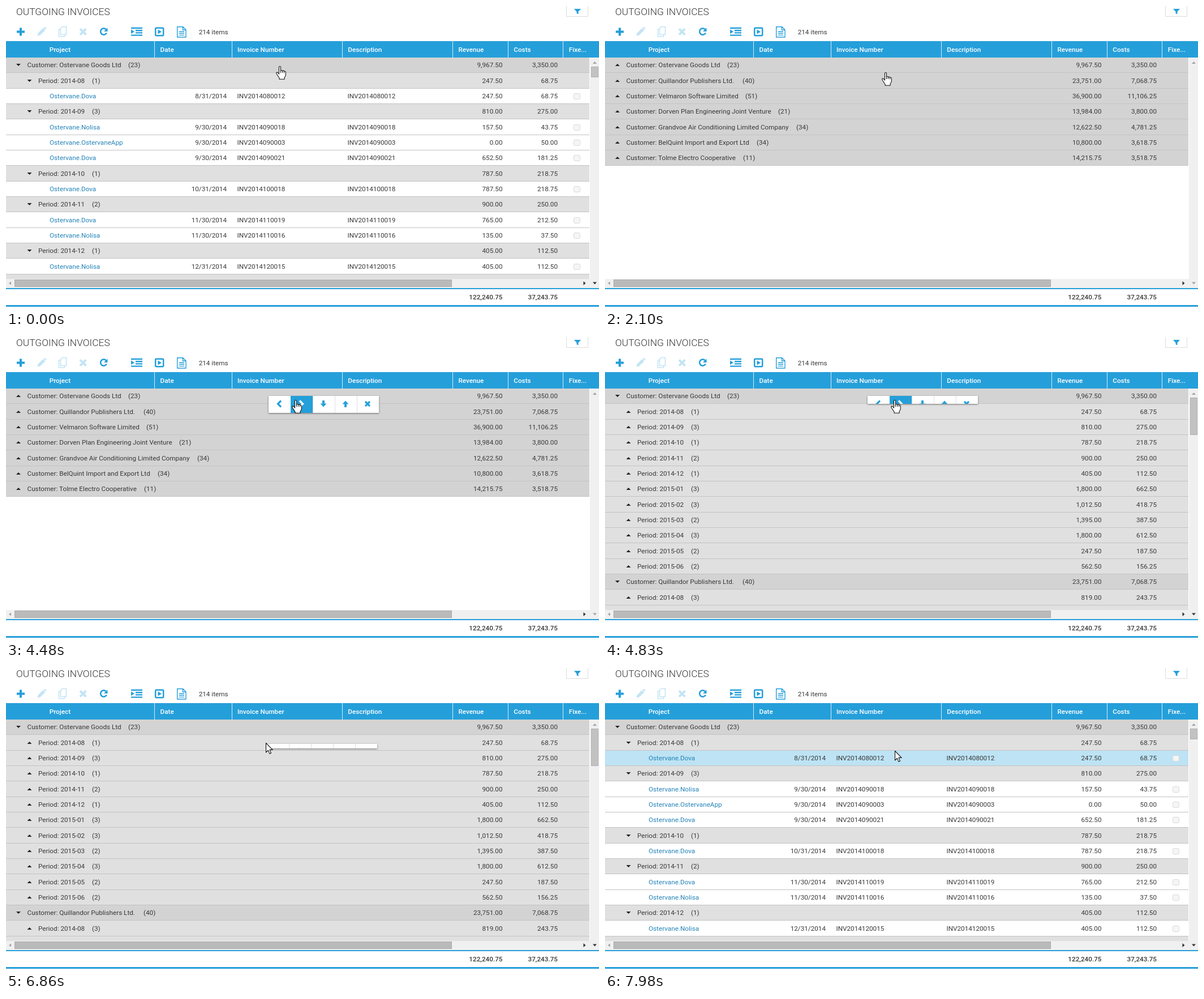
Animation of 1048x535 px, one loop 8 s. Source, as an HTML page:

```html
<!DOCTYPE html>
<html lang="en">
<head>
<meta charset="utf-8">
<title>Outgoing invoices</title>
<style>
  html, body { margin: 0; width: 100%; height: 100%; overflow: hidden; background: #fff; }
  svg { display: block; }
  #stage { font: 11.72px Roboto, sans-serif; fill: #383838; }
  .end { text-anchor: end; }
  .bold { font-weight: 500; }
  .title { font-size: 17.4px; font-weight: 300; fill: #333; }
  .head { fill: #fff; font-weight: 500; }
  .link { fill: #2383b8; }
  .blue { fill: #259fda; }
  .line { fill: none; stroke: #259fda; }
  .off { opacity: .27; }
  .customer { fill: #d4d3d3; }
  .period { fill: #e0e0e0; }
  .invoice { fill: #fff; }
  .invoice.hot { fill: #bde3f4; }
  .cell rect { fill: #fff; }
  .cell .edge { fill: #dedede; }
  .cell path { fill: #259fda; }
  .cell .stroke { fill: none; stroke: #259fda; stroke-width: 3.2; }
  .cell.on rect { fill: #259fda; }
  .cell.on path { fill: #fff; }
  .cell.on .stroke { fill: none; stroke: #fff; }
  #shadow { fill: #fff; filter: drop-shadow(0 1px 1.5px rgba(0, 0, 0, .5)); }
  #hand, #arrow { fill: #fff; stroke: #111; stroke-width: 1.1; stroke-linejoin: round; }
</style>
</head>
<body>
<svg id="stage" width="1048" height="535" viewBox="0 0 1048 535">
  <text class="title" x="18" y="16">OUTGOING INVOICES</text>
  <path d="M990.5-1V18.500H1028.500V-1" fill="none" stroke="#dcdcdc"/>
  <path class="blue" d="M1004 5h12l-4.500 5v4.500l-3-1.500v-3z"/>

  <g id="toolbar">
    <path class="line" d="M19 45.500h14M26 38.500v14" stroke-width="4"/>
    <g class="off">
      <path class="blue" d="M55.500 52.500l1-4.500 9-9 3.800 3.700-9.200 9zM66.500 38.200l1.200-1q1-.6 2 .3l1.200 1.300q.8 1-.1 1.900l-1 1.100z"/>
      <path class="line" d="M99.500 36.500h7v14h-10v-11zM96.500 41h-3v13h10v-3" stroke-width="1.600"/>
      <path class="line" d="M131 40.300l10.400 10.400M141.400 40.300l-10.400 10.400" stroke-width="4"/>
    </g>
    <path class="line" d="M177 41.500a5.600 5.600 0 1 0 .8 6" stroke-width="2.600"/>
    <path class="blue" d="M179.500 38.500v6.500h-6.500z"/>
    <path class="line" d="M221 39h20M229 43.200h12M229 47.400h12M221 51.600h20" stroke-width="2.400"/>
    <path class="blue" d="M221 41.500l6 3.800-6 3.800z"/>
    <rect class="line" x="264.200" y="38.700" width="14" height="13.600" rx="1.500" stroke-width="2.500"/>
    <path class="blue" d="M268.500 41.500l6.500 4-6.500 4z"/>
    <path class="line" d="M302.700 36.700h10l5.300 5.300v13h-15.300zM312.500 37v5.200h5.200M306 45.200h9M306 48.300h9M306 51.400h9" stroke-width="1.400"/>
    <text x="340.700" y="50">214 items</text>
  </g>

  <rect class="blue" y="62" width="1048" height="29"/>
  <g id="head"></g>
  <svg y="91" width="1032" height="391" viewBox="0 91 1032 391"><g id="views"></g></svg>

  <rect x="1032" y="91" width="16" height="407" fill="#f0f0f0"/>
  <rect y="482" width="1032" height="16" fill="#f0f0f0"/>
  <rect x="15.500" y="483.500" width="772" height="12" fill="#bababa" stroke="#aaa"/>
  <rect id="thumb" x="1034.500" y="107.500" width="12" fill="#c2c2c2" stroke="#b0b0b0"/>
  <path d="M9 486.500v6l-4-3zM1037 102h7l-3.500-4z" fill="#a3a3a3"/>
  <path d="M1020.500 486v7l4-3.500z" fill="#333"/>
  <path id="down" d="M1037 487.500h7l-3.500 4z"/>

  <rect y="498" width="1048" height="37" fill="#fff"/>
  <rect class="blue" y="498" width="1048" height="2"/>
  <rect class="blue" y="528" width="1048" height="3"/>
  <text class="end bold" x="877.500" y="518">122,240.75</text>
  <text class="end bold" x="975" y="518">37,243.75</text>

  <g id="menu">
    <rect id="shadow" width="195"/>
    <svg id="cells" width="195"></svg>
  </g>
  <g id="hand">
    <path d="M-1.500 2a1.500 1.500 0 0 1 3 0v6q1.500-1.200 3 .5 1.500-1 3 .7 2-.7 2.800 1v5q0 3-2.200 5v3h-9v-2q-2-3-4-6-1.800-2.500-1.200-3.600 1.400-1.400 3.200.9l1.400 1.600z"/>
    <path d="M1.500 8v4M4.500 8.500v3.500M7.500 9.200v3" fill="none"/>
  </g>
  <path id="arrow" d="M.5.5v16.500l3.800-3.600 2.600 6 2.600-1.100-2.600-5.900h5.200z"/>
</svg>

<script>
const $ = id => document.getElementById(id);
const TICK = 70, LOOP = 8000, ROW = 27.344, CELL = 39;

const money = n => n.toLocaleString('en-US', { minimumFractionDigits: 2, maximumFractionDigits: 2 });
const text = (x, y, s, cls = '') => `<text class="${cls}" x="${x}" y="${y}">${s}</text>`;

// Header
$('head').innerHTML =
  [[76.7, 'Project'], [272.5, 'Date'], [409, 'Invoice Number'], [604.3, 'Description'],
   [799.5, 'Revenue'], [897.3, 'Costs'], [994.8, 'Fixe...']].map(([x, s]) => text(x, 81, s, 'head')).join('') +
  [262, 399, 594, 789, 887, 984].map(x => `<rect x="${x}" y="62" width="1" height="29" fill="#d6edf8"/>`).join('');

// Grid data: name, count, x of count, revenue, costs
const customers = [
  ['Ostervane Goods Ltd', 23, 216, 9967.5, 3350],
  ['Quillandor Publishers Ltd.', 40, 243, 23751, 7068.75],
  ['Velmaron Software Limited', 51, 248, 36900, 11106.25],
  ['Dorven Plan Engineering Joint Venture', 21, 306, 13984, 3800],
  ['Grandvoe Air Conditioning Limited Company', 34, 338, 12622.5, 4781.25],
  ['BelQuint Import and Export Ltd', 34, 268, 10800, 3618.75],
  ['Tolme Electro Cooperative', 11, 244, 14215.75, 3518.75]
].map(([name, count, cx, rev, cost]) =>
  ({ kind: 'customer', x: 37.5, label: 'Customer: ' + name, count, cx, rev, cost }));

const period = (month, count, rev, cost) =>
  ({ kind: 'period', x: 57, label: 'Period: ' + month, count, cx: 152, rev, cost });
const periods = [
  ['2014-08', 1, 247.5, 68.75], ['2014-09', 3, 810, 275], ['2014-10', 1, 787.5, 218.75],
  ['2014-11', 2, 900, 250], ['2014-12', 1, 405, 112.5], ['2015-01', 3, 1800, 662.5],
  ['2015-02', 3, 1012.5, 418.75], ['2015-03', 2, 1395, 387.5], ['2015-04', 3, 1800, 612.5],
  ['2015-05', 2, 247.5, 187.5], ['2015-06', 2, 562.5, 156.25]
].map(p => period(...p));

const invoice = (project, date, no, rev, cost) =>
  ({ kind: 'invoice', project: 'Ostervane.' + project, date, no: 'INV' + no, rev, cost });
const invoices = [
  [invoice('Dova', '8/31/2014', '2014080012', 247.5, 68.75)],
  [invoice('Nolisa', '9/30/2014', '2014090018', 157.5, 43.75),
   invoice('OstervaneApp', '9/30/2014', '2014090003', 0, 50),
   invoice('Dova', '9/30/2014', '2014090021', 652.5, 181.25)],
  [invoice('Dova', '10/31/2014', '2014100018', 787.5, 218.75)],
  [invoice('Dova', '11/30/2014', '2014110019', 765, 212.5),
   invoice('Nolisa', '11/30/2014', '2014110016', 135, 37.5)],
  [invoice('Nolisa', '12/31/2014', '2014120015', 405, 112.5)]
];

const open = row => ({ ...row, open: true });
const cutOff = { kind: 'period' };
const views = [
  [open(customers[0]), ...invoices.flatMap((list, i) => [open(periods[i]), ...list]), cutOff],
  customers,
  [open(customers[0]), ...periods, open(customers[1]), period('2014-08', 3, 819, 243.75), cutOff]
];

function drawRow(row, i) {
  const top = Math.round(91 + ROW * i), next = Math.round(91 + ROW * (i + 1));
  const base = Math.round(108.2 + ROW * i), mid = base - 4;
  let out = `<rect class="${row.kind}" y="${top}" width="1031" height="${next - top}"/>` +
    `<rect y="${next - 1}" width="1031" height="1" fill="#c3c3c3"/>`;
  if (row === cutOff) return out;
  if (row.kind === 'invoice') {
    out += text(77, base, row.project, 'link') + text(390, base, row.date, 'end') +
      text(408.5, base, row.no) + text(603.5, base, row.no) +
      `<rect x="1003.5" y="${mid - 4.5}" width="11" height="10" rx="2.5" fill="#f5f5f5" stroke="#dadada"/>`;
  } else {
    const tip = row.open ? `${mid - 2}h8l-4 4z` : `${mid + 2}h8l-4-4z`;
    out += `<path d="M${row.x - 19.5} ${tip}" fill="#222"/>` +
      text(row.x, base, row.label) + text(row.cx, base, `(${row.count})`);
  }
  return out + text(877.5, base, money(row.rev), 'end') + text(975, base, money(row.cost), 'end');
}
$('views').innerHTML = views.map(rows => `<g>${rows.map(drawRow).join('')}</g>`).join('');
const groups = [...$('views').children];
const hotRow = groups[0].querySelector('.invoice');

// Popup menu
const icons = [
  ['stroke', 'M3-5.5l-5.500 5.500 5.500 5.500'],
  ['stroke', 'M-3-5.5l5.500 5.500-5.500 5.500'],
  ['', 'M-2-6h4v5.500h3.500l-5.500 6-5.500-6h3.500z'],
  ['', 'M-2 6h4v-5.500h3.500l-5.500-6-5.500 6h3.500z'],
  ['stroke', 'M-4-4l8 8M4-4l-8 8']
];
$('cells').innerHTML = icons.map(([cls, d], i) =>
  `<g class="cell" transform="translate(${i * CELL})"><rect width="${CELL}" height="30"/>` +
  (i ? '<rect class="edge" width="1" height="30"/>' : '') +
  `<path class="${cls}" transform="translate(19 14)" d="${d}"/></g>`).join('');
const cells = [...document.querySelectorAll('.cell')];

// Timeline
const moves = [ // start, steps, x, y
  [0, 1, 484, 106], [1540, 4, 496, 117], [2660, 6, 462, 102], [4130, 6, 512, 111],
  [5530, 1, 515, 112], [5600, 7, 456, 134], [6230, 2, 459, 132], [7210, 4, 512, 146]
];
const menus = [[560, 1960, 486, 108], [3710, 4830, 464, 104], [6860, 7840, 461, 134]];
const slide = [8, 22, 29, 30];

const ease = p => p * p * (3 - 2 * p);
const show = (el, on) => el.setAttribute('visibility', on ? 'visible' : 'hidden');
const place = (el, x, y) => el.setAttribute('transform', `translate(${x} ${y})`);

function pointer(t) {
  let x = moves[0][2], y = moves[0][3];
  for (const [start, steps, toX, toY] of moves) {
    if (t < start) break;
    const p = ease(Math.min(1, ((t - start) / TICK + 1) / steps));
    x += (toX - x) * p;
    y += (toY - y) * p;
  }
  return [Math.round(x), Math.round(y)];
}

function render(now) {
  const t = Math.floor(now % LOOP / TICK) * TICK;
  const view = t < 2030 ? 0 : t < 4830 ? 1 : t < 7910 ? 2 : 0;
  const hot = t >= 7980;
  const [x, y] = pointer(t);

  groups.forEach((g, i) => g.style.display = i === view ? '' : 'none');
  hotRow.classList.toggle('hot', hot);
  show($('thumb'), view !== 1);
  $('thumb').setAttribute('height', view === 2 ? 65 : 18);
  $('down').setAttribute('fill', view === 1 ? '#a3a3a3' : '#333');

  const menu = menus.find(([from, to]) => t >= from && t < to + TICK);
  let over = -1;
  $('menu').style.display = menu ? '' : 'none';
  if (menu) {
    const [from, to, mx, my] = menu;
    const h = t >= to ? 14 : slide[Math.min(3, (t - from) / TICK)];
    place($('menu'), mx, my);
    $('shadow').setAttribute('height', h);
    $('cells').setAttribute('height', h);
    if (y >= my && x >= mx) over = Math.floor((x - mx) / CELL);
    cells.forEach((c, i) => c.classList.toggle('on', i === over));
  }

  const arrow = hot || (menu && over < 0);
  show($('arrow'), arrow);
  show($('hand'), !arrow);
  place(arrow ? $('arrow') : $('hand'), x, y);
}

function loop() {
  render(performance.now());
  requestAnimationFrame(loop);
}
loop();
</script>
</body>
</html>
```
